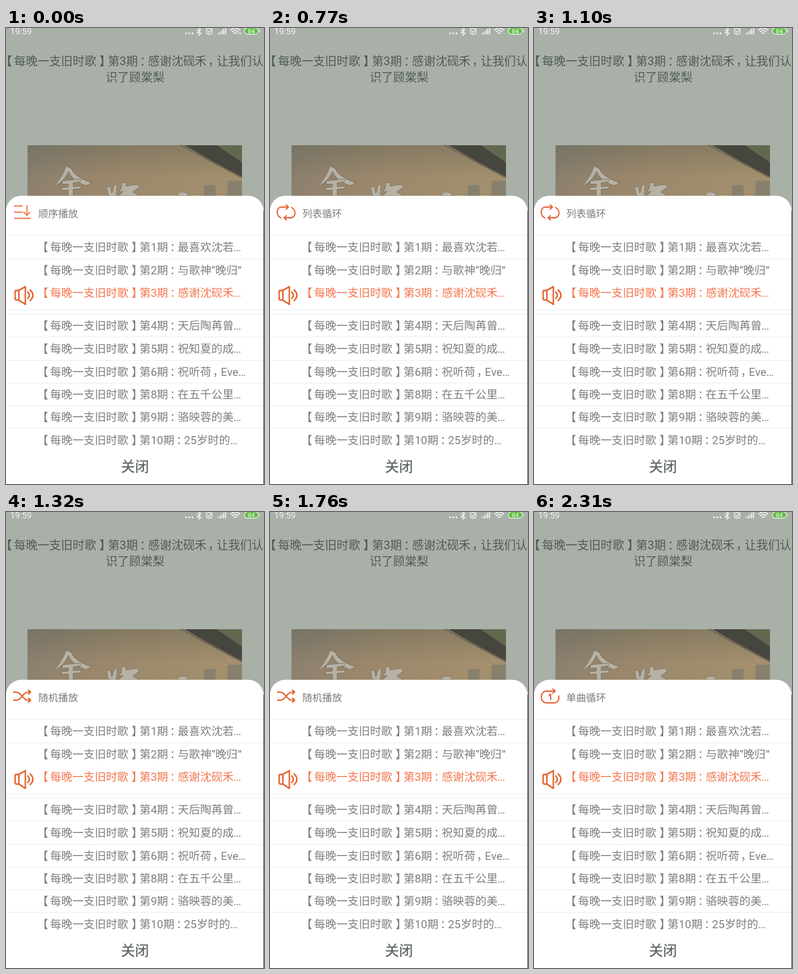
An HTML page for the animation above (2420 ms loop, 480 px wide and 848 px high).

```html
<!DOCTYPE html>
<html lang="zh-CN">
<head>
<meta charset="utf-8">
<style>
html, body { margin: 0; width: 100%; height: 100%; overflow: hidden; background: #a9b0a8; }
svg { display: block; width: 100%; height: 100%; font-family: Roboto, "Noto Sans CJK SC", "Noto Sans CJK", sans-serif; }
.line { fill: none; stroke-linecap: round; stroke-linejoin: round; }
.mode { stroke: #e65f31; stroke-width: 2.3; }
.label { font-size: 18.5px; fill: #7c7c7c; stroke: none; }
</style>
</head>
<body>
<svg viewBox="0 0 480 848" lang="zh-CN">
  <defs>
    <linearGradient id="wall" x2="1" y2=".25">
      <stop offset="0" stop-color="#857d6f"/>
      <stop offset=".45" stop-color="#9a876c"/>
      <stop offset="1" stop-color="#a38f6d"/>
    </linearGradient>
    <linearGradient id="shade" x2="0" y2="1">
      <stop offset="0" stop-color="#5c6150" stop-opacity=".35"/>
      <stop offset=".5" stop-color="#5c6150" stop-opacity="0"/>
    </linearGradient>
  </defs>
  <rect width="480" height="848" fill="#a9b0a8"/>

  <!-- status bar -->
  <text x="8" y="12" font-size="16" fill="#f2f4f2">19:59</text>
  <g class="line" stroke="#f2f4f2" stroke-width="1.5">
    <path d="M335 10h.1M341 10h.1M347 10h.1" stroke-width="3.4"/>
    <path d="M355 3l8 7-4 3.500V0l4 3-8 7"/>
    <circle cx="378" cy="6.500" r="5.500"/>
    <path d="M375.500 6l2 2.500 3.500-4M372 1l2-2M384 1l-2-2"/>
    <path d="M394.500 11v-1M398 11V8M401.500 11V5M405 11V2M408.500 11V-1" stroke-width="2"/>
    <path d="M418 4q8.500-8 17 0M421 7q5.500-5 11 0M424 10q2.500-2 5 0" stroke-width="1.800"/>
    <path id="traffic" d="M433 8v4M437 8v4" stroke-width="1.300"/>
    <rect x="443.500" y="-.5" width="26" height="12" rx="6" fill="#62bd45" stroke-width="1.300"/>
    <path d="M471.500 4v3"/>
  </g>
  <text x="456.500" y="9.500" font-size="11" fill="#fff" text-anchor="middle">84</text>

  <g id="title" font-size="21.8" fill="#505a55"></g>
  <text x="240" y="99" font-size="21.8" fill="#505a55" text-anchor="middle">识了顾棠梨</text>

  <!-- cover picture -->
  <rect x="40" y="218" width="399" height="120" fill="url(#wall)"/>
  <rect x="40" y="218" width="399" height="120" fill="url(#shade)"/>
  <path d="M385 218h54v38z" fill="#62684e"/>
  <path d="M332 218h60l47 32v27l-46-24z" fill="#47463e"/>
  <path d="M325 218l114 60" stroke="#6f6858" stroke-width="3"/>
  <path d="M368 312v-20h22v20zM412 312v-28h27v28z" fill="#87806c"/>
  <g fill="#b5b1a4" stroke="#706755" stroke-width=".8">
    <path d="M112 257l9 4q7 17 39 27l-12 5q-24-9-32-26-8 19-26 27 15-18 22-37z"/>
    <path d="M105 284l34-3-1 5-13 2v7l15-1-2 5-13 1v12h-9v-11l-13 1 1-5 12-1v-6l-11 1z"/>
    <path d="M187 296l7-2 3 13 5-16 5 1-2 20h-14z"/>
    <path d="M216 287l8 2-1 5 20-3 6 4-13 10 12 7h-38l8-8-8 1 4-6z"/>
    <path d="M318 312l6-7 12 1 3 6z"/>
  </g>

  <!-- playlist sheet -->
  <path d="M0 848V340a28 28 0 0 1 28-28H451a28 28 0 0 1 28 28V848z" fill="#fff"/>
  <path d="M479.500 340V848" stroke="#333"/>
  <g class="line mode">
    <g><path d="M16 331H30M16 342.500H30M16 354H45M39 331V348M33 342.500l6 6 5-6" stroke="#f47c50"/>
      <text class="label" x="60" y="352">顺序播放</text></g>
    <g><path d="M20 353C11 349 11 333 22 333H34M30 329l4.500 4-4.500 4M40 334C50 338 48 353 38 353H26M30.500 349l-4.500 4 4.500 4"/>
      <text class="label" x="60" y="352">列表循环</text></g>
    <g><path d="M14 335H19C29 335 31 350 41 350H46M14 350H19C29 350 31 335 41 335H46M42 331l4 4-4 4M42 346l4 4-4 4"/>
      <text class="label" x="60" y="352">随机播放</text></g>
    <g><path d="M39 333H24C10 333 10 355 24 355H36C45 355 47 349 46 342M35 329l4.500 4-4.500 4M28 341l3-2v10"/>
      <text class="label" x="60" y="352">单曲循环</text></g>
  </g>
  <path id="rules" stroke="#dce0ec" stroke-dasharray="2 1"/>
  <g id="list" font-size="20.8"></g>
  <path class="line" stroke="#e5652f" stroke-width="2.800" d="M24 488H20q-3 0-3 3v12q0 3 3 3H24L36 514V481zM24 488V506M40.500 491q6 6 0 12M45 487q10 10 0 20"/>
  <text x="240" y="825" font-size="26" fill="#5b655c" stroke="#5b655c" stroke-width=".3" text-anchor="middle">关闭</text>
</svg>
<script>
const $ = id => document.getElementById(id);

// centre punctuation in its cell: [shift before, shift after] in em
const shifts = { '【': [-.17, .17], '】': [.28, -.28], '：': [.15, -.29], '，': [.12, -.26] };
const line = (x, y, text, fill) => {
  const body = ('【每晚一支旧时歌】' + text).replace(/([【】：，])(.)/g, (_, mark, next) => {
    const [before, after] = shifts[mark];
    return `<tspan dx="${before}em">${mark}</tspan><tspan dx="${after}em">${next}</tspan>`;
  });
  return `<text x="${x}" y="${y}"${fill ? ` fill="${fill}"` : ''}>${body}</text>`;
};

$('title').innerHTML = line(-6.7, 69, '第3期：感谢沈砚禾，让我们认');

const rows = [
  [414.5, '第1期：最喜欢沈若…'],
  [458, '第2期：与歌神“晚归”'],
  [500, '第3期：感谢沈砚禾…'],
  [561, '第4期：天后陶苒曾…'],
  [604, '第5期：祝知夏的成…'],
  [646.5, '第6期：祝听荷，Eve…'],
  [689, '第8期：在五千公里…'],
  [731, '第9期：骆映蓉的美…'],
  [774, '第10期：25岁时的…']
];
$('list').innerHTML = rows.map(([y, text], i) => line(61.2, y, text, i === 2 ? '#f4774f' : '#7c7f83')).join('');
$('rules').setAttribute('d', [385, 429, 524, 532, 574, 618, 660, 702, 744].map(y => `M0 ${y}.5H479`).join(''));

const modes = document.querySelectorAll('.mode > g');
const starts = [0, 550, 1210, 1870];
const begin = performance.now();

function draw(now) {
  const t = Math.max(0, now - begin) % 2420;
  const current = starts.filter(s => s <= t).length - 1;
  modes.forEach((m, i) => m.style.display = i === current ? '' : 'none');
  $('traffic').style.display = t < 220 ? '' : 'none';
  requestAnimationFrame(draw);
}
draw(begin);
</script>
</body>
</html>
```
